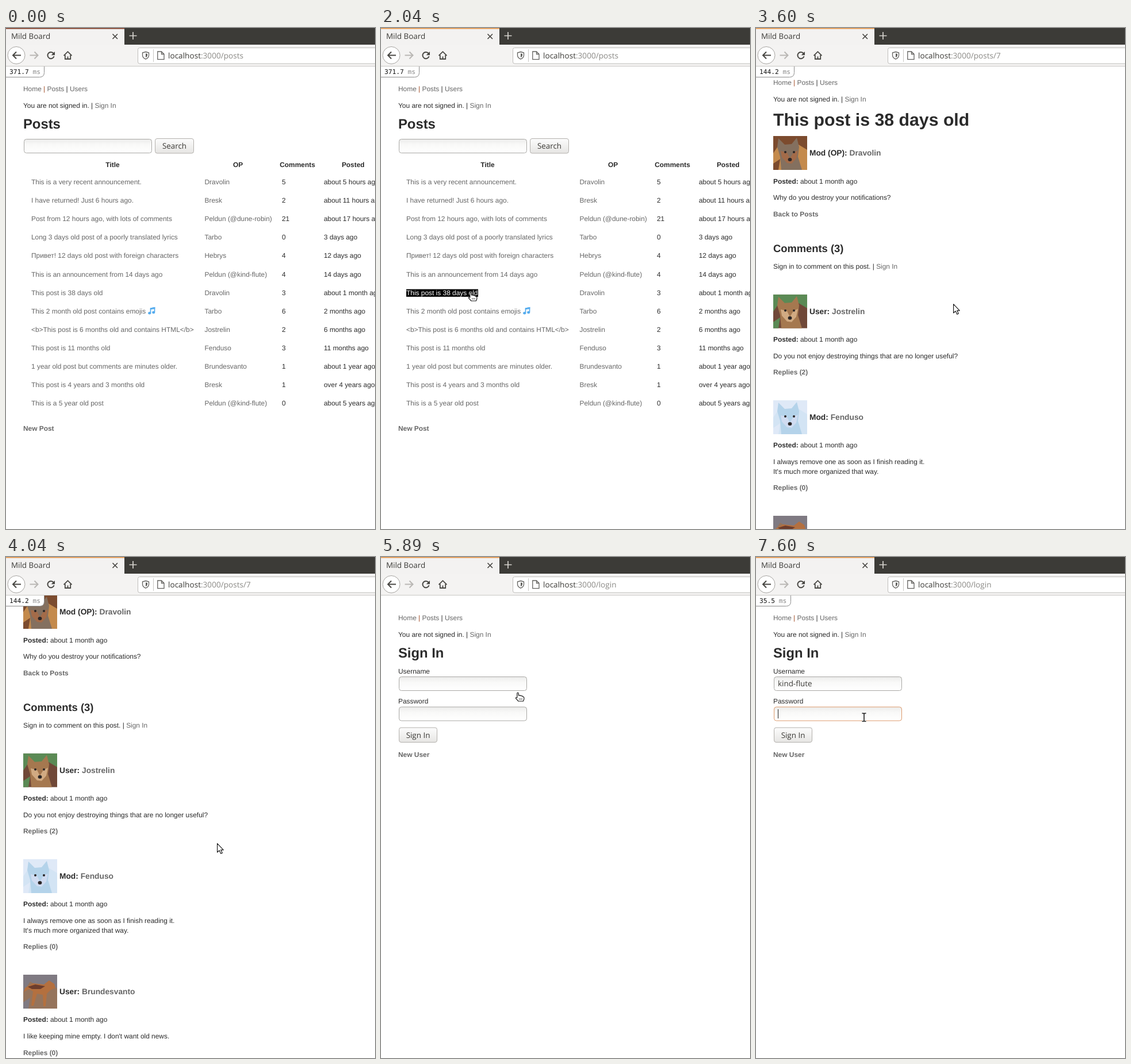
Write an HTML page that moves like this. It is 642 px wide and 872 px high and loops after 8000 ms.

```html
<!DOCTYPE html>
<html lang="en">
<head>
<meta charset="utf-8">
<title>Forum walkthrough</title>
<style>
html, body { margin: 0; height: 100%; overflow: hidden; background: #fff; }
svg { display: block; width: 642px; height: 872px; }
text { font: 11.92px "Liberation Sans", Arial, sans-serif; fill: #2b2b2b; white-space: pre; text-rendering: geometricPrecision; }
.a { fill: #666; }
.b { font-weight: bold; }
.h1 { font-size: 30.25px; font-weight: bold; }
.h2 { font-size: 23.8px; font-weight: bold; }
.h3 { font-size: 18.35px; font-weight: bold; }
.h4 { font-size: 13.75px; font-weight: bold; }
.mid { text-anchor: middle; }
.on { fill: #fff; }
.ui { font: 13.4px "Open Sans", "Noto Sans", sans-serif; fill: #3c3b37; }
.url { font-size: 13.6px; }
.dim { fill: #8a8985; }
.mono { font: 11.2px "DejaVu Sans Mono", monospace; fill: #111; }
.line { fill: none; stroke: #484743; stroke-width: 1.7; }
</style>
</head>
<body>
<svg id="stage" viewBox="0 0 642 872"></svg>
<script>
const LOOP = 8000;

// Markup helpers
const text = (x, y, s, cls = '') => `<text x="${x}" y="${y}" class="${cls}">${s}</text>`;
const rect = (x, y, w, h, attrs) => `<rect x="${x}" y="${y}" width="${w}" height="${h}" ${attrs}/>`;
const path = (d, attrs = 'class="line"') => `<path d="${d}" ${attrs}/>`;
const group = (id, body, attrs = '') => `<g id="${id}" ${attrs}>${body}</g>`;
const link = s => `<tspan class="a">${s}</tspan>`;
const bold = s => `<tspan class="b">${s}</tspan>`;
const field = (y, id = '') => rect(31.5, y, 222, 24, `id="${id}" rx="4" fill="url(#inset)" stroke="#a9a8a5"`);
const button = (x, y, w, label) =>
  rect(x, y, w, 25.5, 'rx="3.5" fill="url(#raised)" stroke="#b3b0ac"') +
  text(x + w / 2, y + 17.7, label, 'ui mid');
const caret = (id, x, y) => group(id, rect(x, y, 1, 16, 'fill="#222"'));
const hovered = (id, x, y, w, label) =>
  group(id, rect(x, y - 10, w, 13.2, 'fill="#000"') + text(x, y, label, 'on'));

const menu =
  text(30, 110, `${link('Home')} <tspan fill="#a5502a">|</tspan> ${link('Posts')} | ${link('Users')}`) +
  text(30, 138.5, `You are not signed in. | ${link('Sign In')}`);

// Post list
const rows = [
  ['This is a very recent announcement.', 'Dravolin', 5, 'about 5 hours ago'],
  ['I have returned! Just 6 hours ago.', 'Bresk', 2, 'about 11 hours ago'],
  ['Post from 12 hours ago, with lots of comments', 'Peldun (@dune-robin)', 21, 'about 17 hours ago'],
  ['Long 3 days old post of a poorly translated lyrics', 'Tarbo', 0, '3 days ago'],
  ['Привет! 12 days old post with foreign characters', 'Hebrys', 4, '12 days ago'],
  ['This is an announcement from 14 days ago', 'Peldun (@kind-flute)', 4, '14 days ago'],
  ['This post is 38 days old', 'Dravolin', 3, 'about 1 month ago'],
  ['This 2 month old post contains emojis', 'Tarbo', 6, '2 months ago'],
  ['&lt;b&gt;This post is 6 months old and contains HTML&lt;/b&gt;', 'Jostrelin', 2, '6 months ago'],
  ['This post is 11 months old', 'Fenduso', 3, '11 months ago'],
  ['1 year old post but comments are minutes older.', 'Brundesvanto', 1, 'about 1 year ago'],
  ['This post is 4 years and 3 months old', 'Bresk', 1, 'over 4 years ago'],
  ['This is a 5 year old post', 'Peldun (@kind-flute)', 0, 'about 5 years ago']
];
const notes = path('M251.5 496V488.2L258.5 486.8V494.6', 'fill="none" stroke="#55acee" stroke-width="1.7"') +
  '<g fill="#55acee"><ellipse cx="249.7" cy="496.3" rx="2.6" ry="2.2"/><ellipse cx="256.7" cy="495" rx="2.6" ry="2.2"/>' +
  '<path d="M251 487.3L259.3 485.8V488.7L251 490.2Z"/></g>';

const listPage = menu + text(30, 174.8, 'Posts', 'h2') + field(193.5) + button(259.5, 192.5, 67, 'Search') +
  [['Title', 185.5], ['OP', 403.5], ['Comments', 507], ['Posted', 604]]
    .map(([s, x]) => text(x, 241.5, s, 'b mid')).join('') +
  rows.map(([title, user, count, age], i) => {
    const y = 272 + 32.1 * i;
    return text(44, y, title, 'a') + text(345.5, y, user, 'a') + text(480, y, count) + text(553, y, age);
  }).join('') + notes + text(30, 701.3, 'New Post', 'a b') +
  hovered('hotPost', 44, 464.6, 125, rows[6][0]);

// Post with comments
const picture = (y, bg, spot, fur, shade) => `<svg x="30" y="${y}" width="59" height="59">` +
  rect(0, 0, 59, 59, `fill="${bg}"`) +
  path('M0 0H59V24L44 15 30 22 12 12 0 30ZM0 48L12 40 9 59H0Z', `fill="${spot}"`);
const face = (y, bg, spot, fur, shade) => picture(y, bg, spot) +
  path('M14 59L12 36 7 19 9 4 20 15 32 14 41 3 45 19 43 36 50 59Z', `fill="${fur}"`) +
  path('M13 26L24 29 29 39 35 29 43 25 40 39 32 48 24 47 15 37Z', `fill="${shade}"`) +
  '<g fill="#2b2626"><circle cx="21" cy="28" r="2"/><circle cx="36" cy="28" r="2"/><ellipse cx="29" cy="41" rx="3.4" ry="3"/></g></svg>';
const runner = y => picture(y, '#95745c', '#7f7a82') +
  path('M3 23L17 15 36 17 45 10 54 16 56 23 47 27 41 33 39 55H35L34 35 24 33 18 54H14L17 29 10 25 1 30Z', 'fill="#b4703f"') +
  path('M8 21L21 17 38 20 30 25 15 25Z', 'fill="#6d3d2c"') + '</svg>';

const byline = (y, role, user) => text(93, y, `${role}: ${link(user)}`, 'h4');
const posted = y => text(30, y, `${bold('Posted:')} about 1 month ago`);
const comment = (y, image, role, user, lines, replies) => {
  const end = y + 111 + 16.5 * (lines.length - 1);
  return image + byline(y + 34, role, user) + posted(y + 82.3) +
    lines.map((s, i) => text(30, y + 111 + 16.5 * i, s)).join('') +
    text(30, end + 28.5, `Replies (${replies})`, 'a b');
};
const postPage = menu + text(30, 181, rows[6][0], 'h1') +
  face(199, '#c48a4c', '#7c4b2e', '#84705f', '#a36b49') + byline(233, 'Mod (OP)', 'Dravolin') +
  posted(282) + text(30, 310.4, 'Why do you destroy your notifications?') +
  text(30, 338.9, 'Back to Posts', 'a b') + text(30, 401, 'Comments (3)', 'h3') +
  text(30, 429.7, `Sign in to comment on this post. | ${link('Sign In')}`) +
  comment(474.7, face(474.7, '#704838', '#5b8a55', '#a5784f', '#d1aa82'), 'User', 'Jostrelin',
    ['Do you not enjoy destroying things that are no longer useful?'], 2) +
  comment(659, face(659, '#d3e4f4', '#dfe9f7', '#b4d3ea', '#d0dcf1'), 'Mod', 'Fenduso',
    ['I always remove one as soon as I finish reading it.', "It's much more organized that way."], 0) +
  comment(860, runner(860), 'User', 'Brundesvanto', ["I like keeping mine empty. I don't want old news."], 0) +
  hovered('hotSign', 210, 429.7, 37, 'Sign In');

// Sign-in form
const loginPage = menu + text(30, 174.8, 'Sign In', 'h2') +
  text(30, 203, 'Username') + field(208.5, 'userField') + group('userText', text(38, 225.4, 'kind-flute', 'ui')) +
  text(30, 255.2, 'Password') + field(261, 'passField') +
  button(31.5, 297, 66, 'Sign In') + text(30, 347.6, 'New User', 'a b') +
  caret('userCaret', 38, 213) + caret('endCaret', 97, 213) + caret('passCaret', 38, 265) +
  group('suggest', rect(32, 236, 225, 21.5, 'fill="#555" opacity=".75" filter="url(#blur)"') +
    rect(30.5, 234.5, 224.5, 20.5, 'fill="#fff" stroke="#aaa"') +
    rect(31, 235, 223.5, 19.5, 'id="pick" fill="#f07746"') +
    text(37, 249.3, '<tspan id="pickText">kind-flute</tspan>', 'ui'));

// Browser frame
const chrome = rect(0, 0, 642, 29, 'fill="#3c3b37"') + rect(0, 0, 206, 30, 'fill="#f3f2f1"') +
  rect(0, 0, 206, 1.7, 'id="stripe"') + rect(0, 29, 642, 37.5, 'fill="#f4f3f2"') +
  rect(0, 66, 642, 1, 'fill="#c9c7c4"') + text(9, 19.4, 'Mild Board', 'ui') +
  path('M185.5 10.5L194 19M194 10.5L185.5 19') +
  path('M214.5 13.5H227.5M221 7V20', 'stroke="#d5d3cd" stroke-width="1.7"') +
  '<circle cx="18" cy="47.5" r="15" fill="#fff" stroke="#a5a39f"/>' +
  path('M26 47.5H12M18 41.5L12 47.5 18 53.5', 'class="line" style="stroke-width:2"') +
  path('M41.5 47.5H55M49.5 41.5L55.5 47.5 49.5 53.5', 'class="line" style="stroke:#b9b7b4;stroke-width:2"') +
  path('M82.6 44A5.7 5.7 0 1 0 83.6 49.3', 'class="line" style="stroke-width:2"') +
  path('M85 41V47.3H78.7Z', 'fill="#484743"') +
  path('M100.5 48.2L107.5 41.2 114.5 48.2M102.8 47V54H112.2V47M107.5 54V49.5', 'class="line" style="stroke-width:1.8"') +
  rect(229.5, 34.5, 430, 27.5, 'rx="3" fill="#fff" stroke="#bebcb9"') +
  path('M243 41.5L248.5 43V47.5Q248.3 52 243 54.2 237.7 52 237.5 47.5V43Z', 'class="line" style="stroke:#62615e;stroke-width:1.3"') +
  path('M243 44.2V51.5Q246 50 246 47.3V45Z', 'fill="#62615e"') + rect(256, 37, 1, 22, 'fill="#c9c7c4"') +
  path('M263.8 41H270.5L275 45.5V54.7H263.8ZM270.5 41V45.5H275', 'class="line" style="stroke:#62615e;stroke-width:1.3"') +
  text(282, 52.8, 'localhost<tspan class="dim">:3000/<tspan id="route"></tspan></tspan>', 'ui url');

const badge = (id, w, ms) => group(id,
  path(`M-1 66.5H${w}V77.5Q${w} 85.5 ${w - 8} 85.5H-1Z`, 'fill="#fff" stroke="#8b8b8b"') +
  text(6, 80, `${ms} <tspan fill="#888">ms</tspan>`, 'mono'));

const outline = 'fill="#fff" stroke="#1d1d1d" stroke-width="1.2" stroke-linejoin="round"';
const pointer = group('cursor',
  group('arrow', path('M.6 .6V16L4.2 12.8 6.8 18.3 9.3 17.1 6.8 11.8H11.3Z', outline)) +
  group('hand', path('M-1.2 9V1Q0 -1 1.3 1V5Q3 4 4 5.4 5.7 4.6 6.6 6 8.5 5.6 9 7.4 10.8 7 10.8 9V11.5L9.4 15H1L-3.6 9.8Q-3.4 7.7 -1.2 9Z', outline) +
    path('M2.8 10V12.5M5 10V12.5M7.2 10V12.5', 'stroke="#1d1d1d" stroke-width=".8"')) +
  group('beam', path('M-3.5 -7H-1L0 -6 1 -7H3.5M0 -6V6M-3.5 7H-1L0 6 1 7H3.5', 'fill="none" stroke="#fff" stroke-width="3.4"') +
    path('M-3.5 -7H-1L0 -6 1 -7H3.5M0 -6V6M-3.5 7H-1L0 6 1 7H3.5', 'fill="none" stroke="#1d1d1d" stroke-width="1.6"')));

const stage = document.getElementById('stage');
stage.innerHTML = `<defs>
  <linearGradient id="inset" x2="0" y2="1"><stop stop-color="#ececeb"/><stop offset=".4" stop-color="#f9f9f8"/><stop offset="1" stop-color="#fff"/></linearGradient>
  <linearGradient id="raised" x2="0" y2="1"><stop stop-color="#fcfcfc"/><stop offset="1" stop-color="#e6e5e3"/></linearGradient>
  <filter id="blur"><feGaussianBlur stdDeviation="1"/></filter></defs>` +
  rect(0, 0, 642, 872, 'fill="#fff"') +
  group('list', listPage) + group('post', postPage) + group('login', loginPage) +
  badge('badgeList', 66.5, '371.7') + badge('badgePost', 66.5, '144.2') + badge('badgeLogin', 60.5, '35.5') +
  chrome + pointer;

const el = {};
stage.querySelectorAll('[id]').forEach(n => { el[n.id] = n; });
const show = (id, on) => { el[id].style.display = on ? '' : 'none'; };

// Keys are [time, values..., smooth]; smooth eases the way into the key
const move = [
  [1260, 644, 707, 0], [1960, 162, 463, 1], [2040, 156, 460, 0], [2940, 156, 460, 0], [3350, 341, 478, 1],
  [3560, 341, 478, 0], [4040, 367, 498, 0], [4320, 391, 525, 0], [4560, 391, 525, 0], [5200, 261, 250, 1],
  [5360, 235, 237, 0], [5400, 238, 236, 0], [6080, 238, 236, 0], [6480, 227, 223, 1], [6710, 227, 223, 0],
  [6930, 190, 243, 1], [7090, 188, 245, 0], [7290, 166, 257, 1], [7340, 172, 273, 0], [7480, 172, 273, 0], [7600, 188, 279, 0]
];
const wheel = [[3560, 0, 0], [4040, 133, 0], [4320, 191, 0]];

function sample(keys, t) {
  const i = keys.findIndex(k => k[0] > t);
  if (i === 0) return keys[0].slice(1, -1);
  if (i < 0) return keys[keys.length - 1].slice(1, -1);
  const from = keys[i - 1], to = keys[i];
  let p = (t - from[0]) / (to[0] - from[0]);
  if (to[to.length - 1]) p = p * p * (3 - 2 * p);
  return from.slice(1, -1).map((v, k) => v + (to[k + 1] - v) * p);
}

function draw(t) {
  const within = (a, b = LOOP) => t >= a && t < b;
  const [x, y] = sample(move, t);
  const [scroll] = sample(wheel, t);

  show('list', within(0, 2500));
  show('post', within(2500, 5860));
  show('login', within(5860));
  show('badgeList', within(0, 2500));
  show('badgePost', within(2660, 5860));
  show('badgeLogin', within(6000));
  el.route.textContent = t < 2420 ? 'posts' : t < 5800 ? 'posts/7' : 'login';
  el.stripe.setAttribute('fill', t < 1300 ? '#86452f' : '#e59b52');
  el.post.setAttribute('transform', `translate(0 ${-Math.round(scroll)})`);

  show('hotPost', within(1940, 2500));
  show('hotSign', within(5400, 5860));

  const userFocus = within(6440, 7560), passFocus = within(7560), filled = within(7090);
  el.userField.setAttribute('stroke', userFocus ? '#dd9a6c' : '#a9a8a5');
  el.passField.setAttribute('stroke', passFocus ? '#dd9a6c' : '#a9a8a5');
  show('userText', filled);
  show('userCaret', userFocus && !filled);
  show('endCaret', userFocus && filled);
  show('passCaret', passFocus);
  show('suggest', within(6520, 7090));
  const picked = within(6710) && y > 235;
  show('pick', picked);
  el.pickText.setAttribute('fill', picked ? '#fff' : '#3c3b37');

  const hand = within(1940, 2560) || within(5400, 5920);
  const beam = within(6160, 6520) || within(7340);
  show('cursor', within(1260));
  show('hand', hand);
  show('beam', beam);
  show('arrow', !hand && !beam);
  el.cursor.setAttribute('transform', `translate(${Math.round(x)} ${Math.round(y)})`);
}

const start = performance.now();
function tick() {
  draw((performance.now() - start) % LOOP);
  requestAnimationFrame(tick);
}
tick();
</script>
</body>
</html>
```
